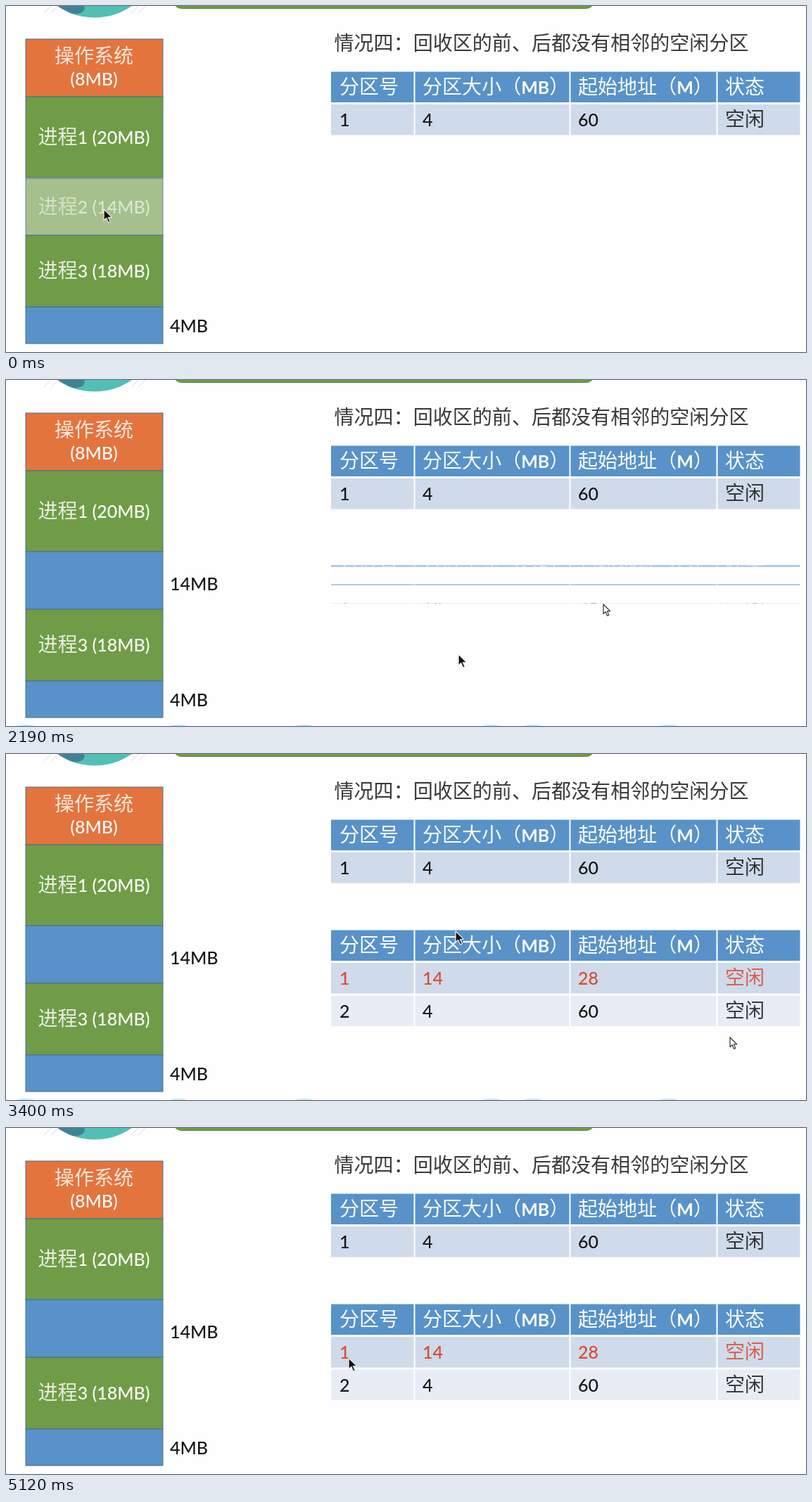
An HTML page with a canvas that plays this animation: 1137x492 px, repeating every 5.15 s.

```html
<!DOCTYPE html>
<html lang="zh">
<head>
<meta charset="utf-8">
<style>
html, body { margin: 0; width: 100%; height: 100%; overflow: hidden; background: #fefefe; }
canvas { display: block; }
</style>
</head>
<body>
<canvas id="stage" width="1137" height="492"></canvas>
<script>
const c = document.getElementById('stage').getContext('2d');
const LOOP = 5150;
const BLUE = '#5892c9', GREEN = '#709c47', ORANGE = '#e3743e', WHITE = '#fdfdfb';
const INK = '#161616', RED = '#d84b2f', EDGE = '#48708c';
const POINTER = new Path2D('M0 0V16L3.7 12.6L6.6 19L9.2 17.8L6.4 11.6L11.4 11.4Z');

// Resting points of the two cursors: time, x, y
const presenter = [[200, 139, 289], [940, 200, 303], [2190, 643, 390],
  [2780, 612, 300], [3400, 639, 252], [4370, 687, 113], [5120, 487, 327]];
const viewer = [[500, 822, 492], [700, 849, 319], [3050, 849, 319], [3400, 1029, 403], [3700, 1040, 494]];

const ramp = (t, from, to) => Math.min(1, Math.max(0, (t - from) / (to - from)));
const ease = k => k * k * (3 - 2 * k);

function along(keys, t) {
  let [, x, y] = keys[0];
  for (let i = 1; i < keys.length; i++) {
    const [t0, x0, y0] = keys[i - 1], [t1, x1, y1] = keys[i];
    const k = ease(ramp(t, t0, t1));
    x += (x1 - x0) * k;
    y += (y1 - y0) * k;
  }
  return [x, y];
}

function rect(color, x, y, w, h) {
  c.fillStyle = color;
  c.fillRect(x, y, w, h);
}

// Latin and CJK runs use different fonts; the CJK strokes are thinner and paler
function text(str, x, y, color, { bold = false, center = false } = {}) {
  const alpha = c.globalAlpha;
  const runs = str.match(/[\x20-\x7e]+|[^\x20-\x7e]+/g).map(s => {
    const latin = s.charCodeAt(0) < 127;
    const font = latin
      ? `${bold ? 700 : 500} 25px Lato, sans-serif`
      : '300 28.06px "Noto Sans CJK SC", "Noto Sans CJK", sans-serif';
    c.font = font;
    return { s, font, fade: latin || bold ? 1 : .85, w: c.measureText(s).width };
  });
  if (center) x -= runs.reduce((sum, r) => sum + r.w, 0) / 2;
  c.fillStyle = color;
  for (const r of runs) {
    c.font = r.font;
    c.globalAlpha = alpha * r.fade;
    c.fillText(r.s, x, y);
    x += r.w;
  }
  c.globalAlpha = alpha;
}

function block(color, y, h, label, edge = EDGE) {
  rect(color, 28, y, 195, h);
  c.strokeStyle = edge;
  c.lineWidth = 1;
  c.strokeRect(28, y, 195, h);
  if (label) text(label, 125, y + h / 2 + 9, WHITE, { center: true });
}

function table(y, rows) {
  const cols = [474, 592, 813, 1022];
  const head = ['分区号', '分区大小（MB）', '起始地址（M）', '状态'];
  rect(BLUE, 462, y, 666.5, 43.5);
  head.forEach((s, i) => text(s, cols[i], y + 31, WHITE, { bold: true }));
  rows.forEach(([color, ...cells], r) => {
    const top = y + 46.5 + r * 46.5;
    rect(r ? '#e8edf5' : '#cfdaea', 462, top, 666.5, 43.5);
    cells.forEach((s, i) => text(s, cols[i], top + 31, color));
  });
  for (const x of cols.slice(1)) rect('#fff', x - 12.5, y, 2, 44 + rows.length * 46.5);
}

function arrow([x, y], fill, line, scale) {
  c.save();
  c.translate(x, y);
  c.scale(scale, scale);
  c.lineJoin = 'round';
  c.lineWidth = 1.3;
  c.strokeStyle = line;
  c.fillStyle = fill;
  c.fill(POINTER);
  c.stroke(POINTER);
  c.restore();
}

function header() {
  c.beginPath();
  c.arc(126, -76.5, 93, 0, 7);
  c.fillStyle = '#52bfb5';
  c.fill();
  c.save();
  c.clip();
  c.beginPath();
  c.ellipse(91, 0, 21, 11, .2, 0, 7);
  c.fillStyle = '#3f8296';
  c.fill();
  c.restore();
  c.strokeStyle = '#e6eaf2';
  c.lineWidth = 1.5;
  for (const x of [54, 64, 178, 188]) {
    c.beginPath();
    c.moveTo(x, 10);
    c.lineTo(x + 10, 0);
    c.stroke();
  }
  c.beginPath();
  c.roundRect(237.5, -46, 599, 49.5, 12);
  c.fillStyle = '#6c9e45';
  c.fill();
  c.strokeStyle = '#587f3c';
  c.lineWidth = 1;
  c.stroke();
}

function overlayTips() {
  c.fillStyle = '#bfe8f7';
  for (const x of [28, 245, 424, 690, 749, 942]) {
    c.beginPath();
    c.ellipse(x, 493, 14, 3, 0, 0, 7);
    c.fill();
  }
}

function memory(t) {
  const freed = ramp(t, 1500, 1600);
  block(ORANGE, 47, 82);
  text('操作系统', 125, 80.5, WHITE, { center: true });
  text('(8MB)', 125, 113, WHITE, { center: true });
  block(GREEN, 129, 115, '进程1 (20MB)');
  c.globalAlpha = freed;
  block(BLUE, 244, 82);
  text('14MB', 233, 299, INK);
  c.globalAlpha = .62 * (1 - freed);
  block(GREEN, 245, 81, '进程2 (14MB)', '#2b4f9c');
  c.globalAlpha = 1;
  block(GREEN, 326, 102, '进程3 (18MB)');
  block(BLUE, 428, 52);
  text('4MB', 233, 464, INK);
}

// The second table opens like horizontal blinds, upper slats first
function blinds(t) {
  const pitch = 27, start = 2170, time = 170;
  if (t < start) return;
  c.save();
  c.globalAlpha = .4 + .6 * ramp(t, start, start + time);
  c.beginPath();
  for (let i = 0; i < 6; i++) {
    const open = ramp(t - i * 5, start, start + time);
    c.rect(462, 236 + i * pitch, 668, Math.round(pitch * open));
  }
  c.clip();
  table(250.5, [[RED, '1', '14', '28', '空闲'], [INK, '2', '4', '60', '空闲']]);
  c.restore();
}

function draw(t) {
  rect('#fefefe', 0, 0, 1137, 492);
  header();
  memory(t);
  text('情况四：回收区的前、后都没有相邻的空闲分区', 466.5, 63, INK);
  table(93.5, [[INK, '1', '4', '60', '空闲']]);
  blinds(t);
  if (t >= 500 && t < 4100) overlayTips();
  arrow(along(presenter, t), '#111', '#e8e8e8', 1);
  if (t >= 500 && t < 3700) arrow(along(viewer, t), '#fff', '#222', .85);
}

function frame(now) {
  draw(now % LOOP);
  requestAnimationFrame(frame);
}
requestAnimationFrame(frame);
</script>
</body>
</html>
```
